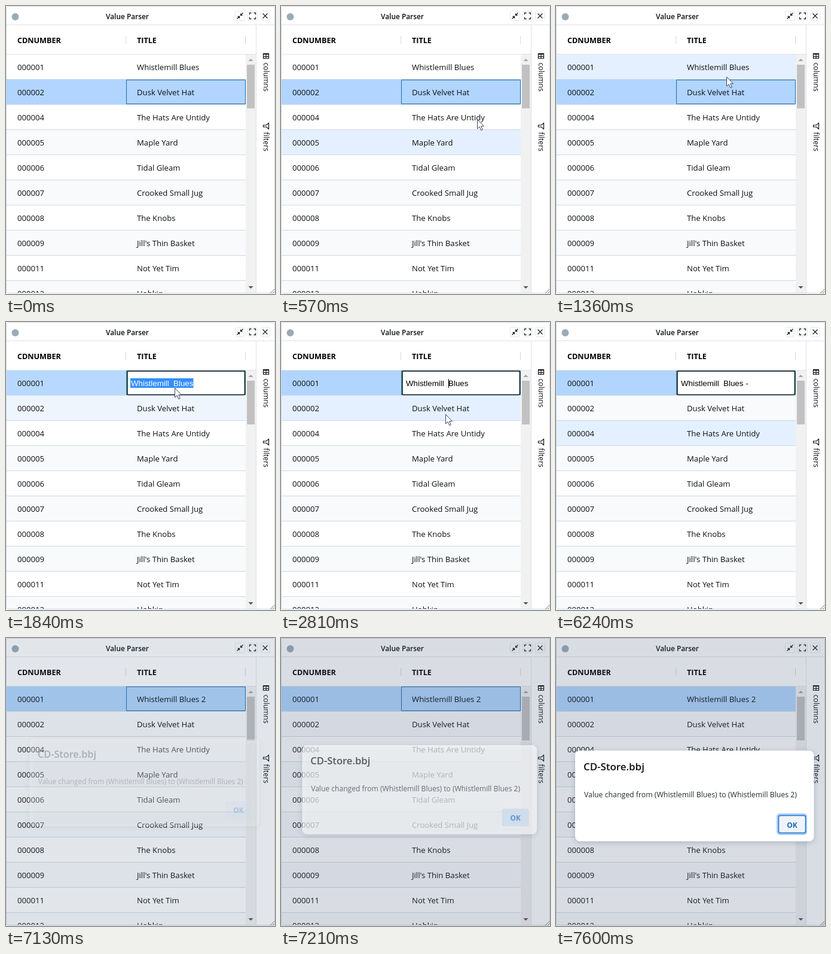
Write an HTML page with a canvas that moves like this. It is 450 px wide and 481 px high and loops after 8000 ms.

```html
<!DOCTYPE html>
<html lang="en">
<head>
<meta charset="utf-8">
<title>Value Parser</title>
<style>
html, body { margin: 0; width: 100%; height: 100%; overflow: hidden; background: #fff; }
canvas { display: block; }
</style>
</head>
<body>
<canvas id="stage" width="450" height="481"></canvas>
<script>
const ctx = document.getElementById('stage').getContext('2d');
const LOOP = 8000, ROW = 42, TOP = 80;
const UI = '"Open Sans", "Noto Sans", sans-serif';
const CELL = '13.15px ' + UI;
const INPUT = '13.33px "Liberation Sans", Arial, sans-serif';
const INK = '#0c0f12';

const ids = [1, 2, 4, 5, 6, 7, 8, 9, 11, 12];
const titles = ['Whistlemill Blues', 'Dusk Velvet Hat', 'The Hats Are Untidy', 'Maple Yard',
  'Tidal Gleam', 'Crooked Small Jug', 'The Knobs', "Jill's Thin Basket", 'Not Yet Tim', 'Hobkin'];
const edited = titles[0] + ' 2';
const draft = titles[0].replace(' ', '  ');
const wordStart = draft.indexOf('B');

// Timelines: [start ms, value...]
const SELECT = 1600, EDIT = 1760, ENTER = 6990, FOCUS = 7300;
const hovers = [[0, -1], [500, 4], [550, 3], [640, 2], [720, -1], [1300, 0], [1600, -1],
  [2740, 1], [2860, 2], [ENTER, -1]];
const typed = [[0, ''], [4860, ' '], [5430, ' -'], [5740, ' - '], [6490, ' - 2']];
const carets = [[0, 0], [2490, 1], [2970, 0], [3550, 1], [4030, 0], [4280, 1],
  [5340, 0], [5430, 1], [6240, 0], [6490, 1]];
const path = [[430, 402, 306], [500, 368, 243], [570, 328, 189], [660, 307, 156], [800, 293, 138],
  [1120, 293, 138], [1450, 282, 110], [2660, 282, 110], [2970, 268, 200]];

const current = (list, t) => list.findLast(k => k[0] <= t)[1];
const ramp = (t, start, length) => Math.min(1, Math.max(0, (t - start) / length));
const mix = (a, b, p) => 'rgb(' + a.map((v, i) => v + (b[i] - v) * p) + ')';

function rect(x, y, w, h, color) {
  ctx.fillStyle = color;
  ctx.fillRect(x, y, w, h);
}

function box(x, y, w, h, r, fill, stroke, width = 1) {
  ctx.beginPath();
  ctx.roundRect(x, y, w, h, r);
  if (fill) { ctx.fillStyle = fill; ctx.fill(); }
  if (stroke) { ctx.strokeStyle = stroke; ctx.lineWidth = width; ctx.stroke(); }
}

function shape(d, fill, stroke, x = 0, y = 0, width = 1) {
  const p = new Path2D(d);
  ctx.save();
  ctx.translate(x, y);
  if (fill) { ctx.fillStyle = fill; ctx.fill(p); }
  if (stroke) { ctx.strokeStyle = stroke; ctx.lineWidth = width; ctx.stroke(p); }
  ctx.restore();
}

function text(s, x, y, font = CELL, color = INK, align = 'left') {
  ctx.font = font;
  ctx.fillStyle = color;
  ctx.textAlign = align;
  ctx.fillText(s, x, y);
}

function drawRows(t) {
  const hover = current(hovers, t), fade = ramp(t, SELECT, 280);
  const picked = [177, 213, 255], pale = [228, 240, 255];
  ctx.save();
  ctx.beginPath();
  ctx.rect(1, TOP, 400, 399);
  ctx.clip();
  ids.forEach((id, i) => {
    const y = TOP + ROW * i;
    let color = i % 2 ? '#f8fafc' : '#fff';
    if (i === hover) color = mix(pale, pale, 0);
    if (i === 0 && t >= SELECT) color = mix(pale, picked, fade);
    if (i === 1 && fade < 1) color = mix(picked, [248, 250, 252], fade);
    rect(1, y, 400, ROW, color);
    rect(1, y + ROW, 400, 1, '#cbd9e8');
    if (i) rect(1, y, 400, 1, '#cbd9e8');
    text(String(id).padStart(6, '0'), 19, y + 27);
    text(i === 0 && t >= ENTER ? edited : titles[i], 219, y + 27);
  });
  ctx.restore();
  if (t < FOCUS) box(201.5, (t < SELECT ? TOP + ROW : TOP) + 1.5, 199, 40, 0, null, '#1a6cb0');
}

function drawEditor(t) {
  if (t < EDIT || t >= ENTER) return;
  const value = draft + current(typed, t), x = 209;
  box(201.5, 81.5, 199, 40, 2, '#fff', '#2f7f93');
  box(203, 82, 196.5, 39.5, 2, '#fff', '#0b1a22', 1.6);
  ctx.font = INPUT;
  const width = s => ctx.measureText(s).width;
  const selected = t < 2490;
  if (selected) rect(208, 94, width(draft) + 1, 16, '#338fff');
  text(value, x, 107, INPUT, selected ? '#fff' : '#000');
  if (current(carets, t)) {
    const before = t < 4280 ? value.slice(0, wordStart) : value;
    rect(Math.floor(x + width(before)), 95, 1, 15, '#000');
  }
}

function drawTitleBar() {
  ctx.beginPath();
  ctx.arc(15.5, 18, 6, 0, 7);
  ctx.fillStyle = '#9aabb8';
  ctx.fill();
  text('Value Parser', 203, 22, '600 11.9px ' + UI, INK, 'center');
  for (const x of [383.5, 404.5, 425.5]) box(x, 8.5, 16, 16, 3, '#fff', '#e3e6ea');
  shape('M5-5L1-1M1-4V-1H4M-5 5L-1 1M-4 1H-1V4', null, '#222', 391.5, 16.5, 1.3);
  shape('M-5-2V-5H-2M2-5H5V-2M5 2V5H2M-2 5H-5V2', null, '#222', 412.5, 16.5, 1.3);
  shape('M-4-4L4 4M4-4L-4 4', null, '#222', 433.5, 16.5, 1.3);
  rect(0, 31, 450, 1, '#dde2e8');
}

function drawFrame() {
  text('CDNUMBER', 19, 62, '700 12.6px ' + UI, '#000');
  text('TITLE', 219, 62, '700 12.6px ' + UI, '#000');
  rect(200, 50, 1, 13, '#d3d8dd');
  rect(400, 50, 1, 13, '#d3d8dd');
  rect(1, 80, 417, 1, '#dfe4ea');
}

function sideLabel(s, y) {
  ctx.save();
  ctx.translate(430.5, y);
  ctx.rotate(Math.PI / 2);
  text(s, 0, 0, '12.2px ' + UI);
  ctx.restore();
}

function drawSides() {
  rect(401, 81, 17, 398, '#f1f1f1');
  rect(403, 98, 13, 73, '#c1c1c1');
  shape('M-4 2L0-2L4 2Z', '#a3a3a3', null, 409.5, 90);
  shape('M-4-2L0 2L4-2Z', '#505050', null, 409.5, 470);
  rect(418, 32, 1, 447, '#dde2eb');
  shape('M-5-4H4V4H-5ZM-5-3H4M-5 1H4M-.5-3V4', null, INK, 435.5, 83.5, 1.2);
  sideLabel('columns', 94.5);
  shape('M4-5V5L0 1.5H-5V-1.5H0Z', null, INK, 435.5, 200.5, 1.2);
  sideLabel('filters', 210.5);
  box(.5, .5, 449, 479, 3, null, '#d0dae4');
  shape('M442 480L449 473M446 480L449 477', null, '#777');
}

function drawCursor(t) {
  if (t < 430 || (t >= 2240 && t < 2660) || t >= 4930) return;
  const i = path.findLastIndex(k => k[0] <= t);
  const a = path[i], b = path[i + 1] || a;
  const p = b === a ? 0 : (t - a[0]) / (b[0] - a[0]);
  const x = Math.round(a[1] + (b[1] - a[1]) * p), y = Math.round(a[2] + (b[2] - a[2]) * p);
  shape('M0 0V15.5L3.6 12.2L6.3 18.2L8.8 17.1L6.2 11.3H11Z', '#fff', '#3b4256', x + .5, y + .5);
}

function drawDialog(t) {
  const dim = ramp(t, ENTER, 190), p = ramp(t, 7080, 200), focused = t >= FOCUS;
  rect(0, 0, 450, 481, `rgba(68,91,120,${.205 * dim})`);
  if (!p) return;
  const scale = .95 + .05 * p;
  ctx.save();
  ctx.globalAlpha = p;
  ctx.translate(231.5, 263.5 - 30 * (1 - p));
  ctx.scale(scale, scale);
  ctx.translate(-231.5, -263.5);
  ctx.shadowColor = 'rgba(40,60,85,.25)';
  ctx.shadowBlur = 10;
  ctx.shadowOffsetY = 2;
  box(32, 188, 399.5, 151.5, 8, '#fff');
  ctx.shadowColor = 'transparent';
  text('CD-Store.bbj', 46, 221, '600 16.9px ' + UI);
  text(`Value changed from (${titles[0]}) to (${edited})`, 47, 266, '12.3px ' + UI, '#262b30');
  if (focused) {
    box(369, 293, 51, 36, 5, '#a9cdf4');
    box(372.5, 296.5, 45, 29, 3, '#f0f3f7', '#1f74c8', 1.5);
  } else {
    box(372, 296, 46, 30, 4, '#c6d8ea');
  }
  text('OK', 395, 316.5, '700 12px ' + UI, '#1b6fbd', 'center');
  ctx.restore();
}

function draw(t) {
  rect(0, 0, 450, 481, '#fff');
  drawTitleBar();
  drawRows(t);
  drawFrame();
  drawEditor(t);
  drawSides();
  drawCursor(t);
  if (t >= ENTER) drawDialog(t);
}

const begin = performance.now();
function tick() {
  draw((performance.now() - begin) % LOOP);
  requestAnimationFrame(tick);
}
tick();
</script>
</body>
</html>
```
